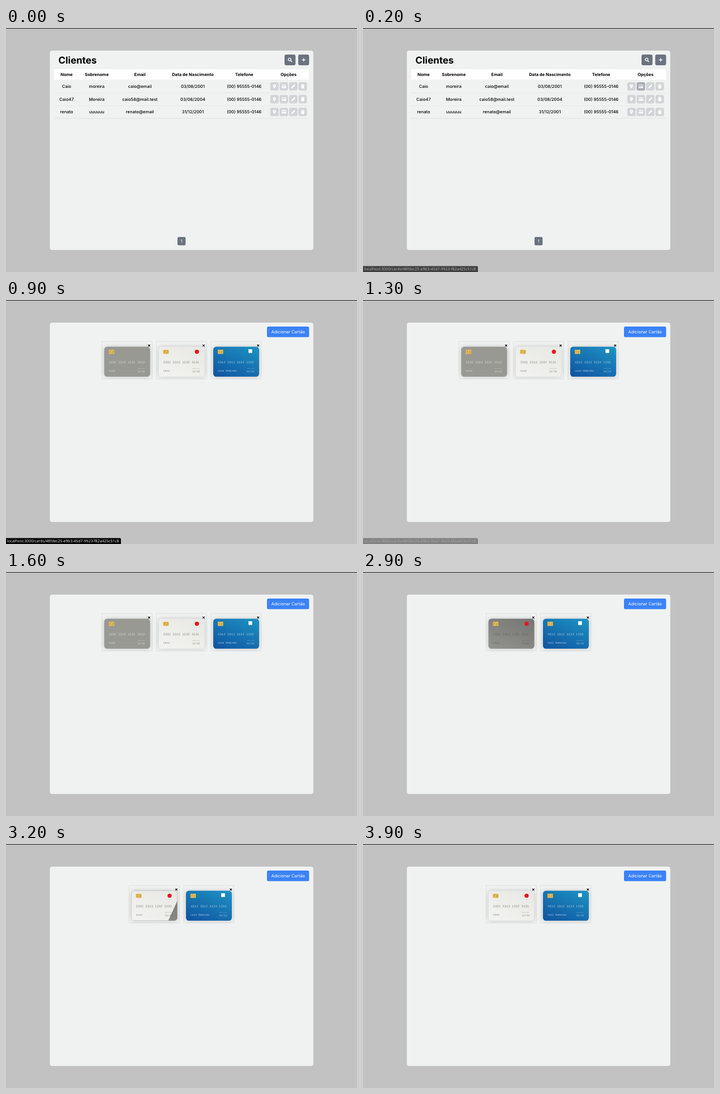
These frames come from a looping animation (620 by 432 pixels, 6200 ms). An HTML page with a canvas:

```html
<!DOCTYPE html>
<html lang="pt-BR">
<head>
<meta charset="utf-8">
<title>Clientes</title>
<style>
html, body { margin: 0; width: 100%; height: 100%; overflow: hidden; background: #c2c2c2; }
canvas { display: block; width: 620px; height: 432px; }
</style>
</head>
<body>
<canvas id="stage"></canvas>
<script>
const W = 620, H = 432, LOOP = 6200, STEP = 100;
const canvas = document.getElementById('stage');
const ctx = canvas.getContext('2d');
const dpr = window.devicePixelRatio || 1;
canvas.width = W * dpr;
canvas.height = H * dpr;

const SANS = 'Inter, sans-serif';
const MONO = '"Liberation Mono", monospace';
const SLATE = '#6b7280', PANEL = '#f0f2f1';
const STATUS = 'localhost:3000/cards/48fdec25-e9b3-45d7-9923-f82a425c51c8';

const columns = [107, 160.3, 236.5, 330, 420.8, 499];
const heads = ['Nome', 'Sobrenome', 'Email', 'Data de Nascimento', 'Telefone', 'Opções'];
const rows = [
  ['Caio', 'moreira', 'caio@email', '03/08/2001', '(00) 95555-0146'],
  ['Caio47', 'Moreira', 'caio58@mail.test', '03/08/2004', '(00) 95555-0146'],
  ['renato', 'uuuuuu', 'renato@email', '31/12/2001', '(00) 95555-0146']
];

const WHITE_INK = 'rgba(255,255,255,.62)', DARK_INK = 'rgba(85,85,85,.68)';
const plain = { number: '1232 1313 1231 2312', name: 'CAIO', expiry: '21/31', fill: ['#999994', '#999994'], ink: WHITE_INK };
const light = { number: '2331 2313 1232 3131', name: 'CAIO', expiry: '12/33', fill: ['#f3f3f1', '#e7e8e3'], ink: DARK_INK, mark: 'circle' };
const blue = { number: '4312 3312 3124 1233', name: 'CAIO MOREIRA', expiry: '01/31', fill: ['#0f539f', '#1e93c4'], ink: WHITE_INK, mark: 'square' };
const BASE_FILL = ['#939390', '#757572'];

const clamp = v => Math.max(0, Math.min(1, v));
const ramp = (t, from, to) => clamp((t - from) / (to - from));

function box(x, y, w, h, r, fill) {
  ctx.beginPath();
  ctx.roundRect(x, y, w, h, r);
  ctx.fillStyle = fill;
  ctx.fill();
}

function label(str, x, y, font, color, align = 'left') {
  ctx.font = font;
  ctx.fillStyle = color;
  ctx.textAlign = align;
  ctx.fillText(str, x, y);
}

function path(points, width, color) {
  ctx.beginPath();
  points.forEach(([x, y], i) => i ? ctx.lineTo(x, y) : ctx.moveTo(x, y));
  ctx.lineWidth = width;
  ctx.strokeStyle = color;
  ctx.stroke();
}

function disc(x, y, r, color) {
  ctx.beginPath();
  ctx.arc(x, y, r, 0, Math.PI * 2);
  ctx.fillStyle = color;
  ctx.fill();
}

// Row icons, each centred on x, y over a button of colour bg
const icons = [
  function pin(x, y, bg) {
    ctx.beginPath();
    ctx.arc(x, y - 1, 2.7, Math.PI * 0.9, Math.PI * 2.1);
    ctx.quadraticCurveTo(x + 2, y + 1.3, x, y + 3.9);
    ctx.quadraticCurveTo(x - 2, y + 1.3, x - 2.6, y - 0.2);
    ctx.fillStyle = '#fff';
    ctx.fill();
    disc(x, y - 1.1, 0.95, bg);
  },
  function card(x, y, bg) {
    box(x - 3.9, y - 3, 7.8, 6, 0.8, '#fff');
    box(x - 3.9, y - 1.6, 7.8, 1.4, 0, bg);
    box(x - 2.9, y + 1.2, 2.8, 0.7, 0, bg);
  },
  function pencil(x, y, bg) {
    path([[x - 2.3, y + 2.3], [x + 2.7, y - 2.7]], 2.4, '#fff');
    ctx.beginPath();
    ctx.moveTo(x - 3.7, y + 3.7);
    ctx.lineTo(x - 3.1, y + 1.3);
    ctx.lineTo(x - 1.3, y + 3.1);
    ctx.fillStyle = '#fff';
    ctx.fill();
    path([[x + 0.5, y - 2.2], [x + 2.2, y - 0.5]], 0.4, bg);
  },
  function trash(x, y) {
    box(x - 3.1, y - 3.4, 6.2, 1, 0.3, '#fff');
    box(x - 1.1, y - 3.9, 2.2, 0.8, 0.2, '#fff');
    box(x - 2.6, y - 1.9, 5.2, 5.6, 0.8, '#fff');
  }
];

function drawTable(hover) {
  label('Clientes', 92.5, 62.6, '700 16.9px ' + SANS, '#000');

  box(492, 47, 19.4, 19, 3, SLATE);
  ctx.beginPath();
  ctx.arc(501, 55.8, 2.4, 0, Math.PI * 2);
  ctx.lineWidth = 1.2;
  ctx.strokeStyle = '#fff';
  ctx.stroke();
  path([[502.7, 57.5], [505.2, 60]], 1.4, '#fff');

  box(516.2, 47, 19.2, 19, 3, SLATE);
  path([[522.7, 56.5], [528.9, 56.5]], 1.3, '#fff');
  path([[525.8, 53.4], [525.8, 59.6]], 1.3, '#fff');

  box(85, 73, 450, 18.5, 0, '#fff');
  heads.forEach((h, i) => label(h, columns[i], 85.2, '700 7.5px ' + SANS, '#000', 'center'));

  rows.forEach((row, r) => {
    const y = 103.4 + r * 22.6;
    row.forEach((s, i) => label(s, columns[i], y + 2.7, '500 7.5px ' + SANS, '#000', 'center'));
    box(85, y + 11, 450, 0.8, 0, '#e2e4e4');
    icons.forEach((icon, i) => {
      const x = 474.2 + i * 16.65;
      const bg = '#d2d4d7';
      box(x - 7.4, y - 7.4, 14.8, 14.8, 2.8, bg);
      const lit = r === 0 && i === 1;
      if (lit) box(x - 7.4, y - 7.4, 14.8, 14.8, 2.8, `rgba(148,153,163,${hover})`);
      icon(x, y, lit && hover > 0.5 ? '#9499a3' : bg);
    });
  });

  box(303, 370, 14.2, 14.8, 2, SLATE);
  label('1', 310, 380.2, '400 7.5px ' + SANS, '#fff', 'center');
}

// Linear gradient at 25 degrees across an 81 by 53 card
function slope(x, y, [from, to]) {
  const a = 25 * Math.PI / 180, cx = x + 40.5, cy = y + 26.5;
  const dx = Math.sin(a) * 41.1, dy = -Math.cos(a) * 41.1;
  const g = ctx.createLinearGradient(cx - dx, cy - dy, cx + dx, cy + dy);
  g.addColorStop(0, from);
  g.addColorStop(1, to);
  return g;
}

function drawChip(x, y) {
  const line = '#9c7a2c';
  box(x, y, 9.8, 7.6, 1, '#e8bf55');
  path([[x, y + 2.5], [x + 3, y + 2.5], [x + 3, y + 5.1], [x, y + 5.1]], 0.5, line);
  path([[x + 9.8, y + 2.5], [x + 6.8, y + 2.5], [x + 6.8, y + 5.1], [x + 9.8, y + 5.1]], 0.5, line);
  path([[x + 3, y + 2.5], [x + 4, y + 1.3], [x + 4, y]], 0.5, line);
  path([[x + 6.8, y + 5.1], [x + 5.8, y + 6.3], [x + 5.8, y + 7.6]], 0.5, line);
}

function drawCard(slot, card, sweep = 1) {
  ctx.lineWidth = 0.8;
  ctx.strokeStyle = '#dcdedf';
  ctx.strokeRect(slot + 0.3, 73.4, 88.6, 66);
  const cx = slot + 83.5, cy = 80.7;
  path([[cx - 1.7, cy - 1.7], [cx + 1.7, cy + 1.7]], 1.1, '#111');
  path([[cx + 1.7, cy - 1.7], [cx - 1.7, cy + 1.7]], 1.1, '#111');

  const x = slot + 4.2, y = 82.8;
  ctx.save();
  ctx.shadowColor = 'rgba(0,0,0,.2)';
  ctx.shadowBlur = 7 * dpr;
  box(x, y, 81, 53, 5.2, slope(x, y, sweep < 1 ? BASE_FILL : card.fill));
  ctx.restore();

  if (sweep > 0 && sweep < 1) {
    const edge = x - 24 + 106 * (1 - (1 - sweep) ** 2);
    ctx.save();
    ctx.beginPath();
    ctx.roundRect(x, y, 81, 53, 5.2);
    ctx.clip();
    ctx.beginPath();
    ctx.moveTo(x - 60, y);
    ctx.lineTo(edge + 24, y);
    ctx.lineTo(edge, y + 53);
    ctx.lineTo(x - 60, y + 53);
    ctx.fillStyle = slope(x, y, card.fill);
    ctx.fill();
    ctx.restore();
  }

  drawChip(x + 7.9, y + 5.2);
  if (card.mark === 'circle') disc(x + 67.4, y + 8.8, 3.7, '#e8131d');
  if (card.mark === 'square') box(x + 62.2, y + 4.4, 6.6, 6.6, 0, '#fff');
  label(card.number, x + 8, y + 29.2, '5.58px ' + MONO, card.ink);
  label(card.name, x + 8.1, y + 43.7, '4.62px ' + MONO, card.ink);
  label('valid thru', x + 72.2, y + 39.3, '2.2px ' + MONO, card.ink, 'right');
  label(card.expiry, x + 72.5, y + 45.2, '4.5px ' + MONO, card.ink, 'right');
}

function drawCards(t) {
  box(461, 47, 74.4, 18.8, 2.6, '#3b82f6');
  label('Adicionar Cartão', 498.3, 59.2, '400 7.5px ' + SANS, '#fff', 'center');
  const removed = t >= 2900;
  const first = removed ? 217.4 : 169.3;
  const cards = removed ? [light, blue] : [plain, light, blue];
  cards.forEach((card, i) => {
    const sweep = removed && i === 0 ? ramp(t, 2900, 3400) : 1;
    drawCard(first + i * 96.3, card, sweep);
  });
}

function drawStatus(alpha) {
  if (alpha <= 0) return;
  ctx.globalAlpha = alpha;
  box(0, 421.4, 203, 10.6, [0, 2, 0, 0], '#000');
  label(STATUS, 2, 429.2, '6.84px "Open Sans", sans-serif', '#f2f2f2');
  ctx.globalAlpha = 1;
}

function draw(t) {
  ctx.setTransform(dpr, 0, 0, dpr, 0, 0);
  ctx.textRendering = 'geometricPrecision';
  box(0, 0, W, H, 0, '#c2c2c2');
  box(0, 0, W, 1, 0, '#1c1c1c');
  box(77.5, 40, 465.3, 353, 4, PANEL);
  if (t < 900) drawTable(ramp(t, 0, 300));
  else drawCards(t);
  drawStatus(t < 900 ? ramp(t, 0, 300) : 1 - ramp(t, 1100, 1400));
}

const start = performance.now();
function tick() {
  const t = (performance.now() - start) % LOOP;
  draw(Math.floor(t / STEP) * STEP);
  requestAnimationFrame(tick);
}
tick();
</script>
</body>
</html>
```
